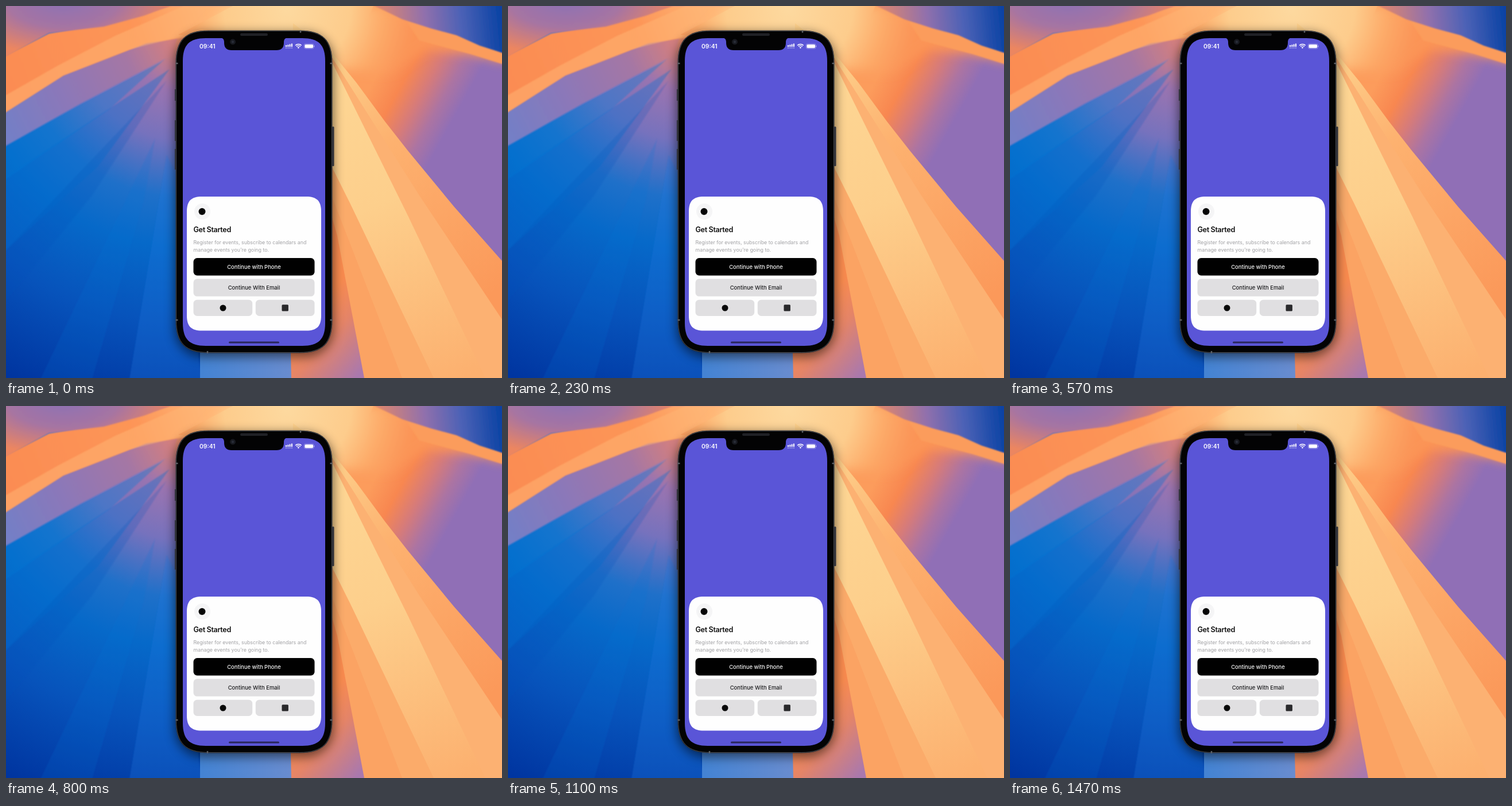
An HTML page that plays this animation: 864x648 px, repeating every 1510 ms.

```html
<!DOCTYPE html>
<html lang="en">
<head>
<meta charset="utf-8">
<title>Get Started</title>
<style>
  html, body { margin: 0; width: 100%; height: 100%; overflow: hidden; background: #0a55ba; }
  svg { display: block; width: 864px; height: 648px; }
  text { font-family: Inter, "Liberation Sans", sans-serif; }
  .mid { text-anchor: middle; font-size: 9.45px; font-weight: 500; }
  .note { font-size: 8.85px; fill: #a2a2a5; }
</style>
</head>
<body>
<svg viewBox="0 0 864 648" xmlns="http://www.w3.org/2000/svg">
  <defs>
    <radialGradient id="sea" gradientUnits="userSpaceOnUse" cx="305" cy="55" r="660">
      <stop offset="0" stop-color="#e68b66"/>
      <stop offset=".07" stop-color="#c27c8c"/>
      <stop offset=".14" stop-color="#9a74b0"/>
      <stop offset=".27" stop-color="#7672bd"/>
      <stop offset=".42" stop-color="#1f70c9"/>
      <stop offset=".55" stop-color="#0669c9"/>
      <stop offset=".75" stop-color="#0753bb"/>
      <stop offset="1" stop-color="#0035a0"/>
    </radialGradient>
    <linearGradient id="haze" gradientUnits="userSpaceOnUse" x1="290" y1="70" x2="0" y2="215">
      <stop offset="0" stop-color="#d27f80"/>
      <stop offset=".25" stop-color="#a577a4"/>
      <stop offset=".65" stop-color="#8b78b9"/>
      <stop offset="1" stop-color="#747fc6"/>
    </linearGradient>
    <radialGradient id="dusk" gradientUnits="userSpaceOnUse" cx="0" cy="0" r="1" gradientTransform="translate(100 -10) scale(195 95)">
      <stop offset="0" stop-color="#8c72b5"/>
      <stop offset=".5" stop-color="#a674a2"/>
      <stop offset="1" stop-color="#ec8660"/>
    </radialGradient>
    <linearGradient id="band" gradientUnits="userSpaceOnUse" x1="0" y1="150" x2="400" y2="0">
      <stop offset="0" stop-color="#fb8c52"/>
      <stop offset=".6" stop-color="#fd9658"/>
      <stop offset="1" stop-color="#ffc384"/>
    </linearGradient>
    <radialGradient id="glow" gradientUnits="userSpaceOnUse" cx="490" cy="5" r="220">
      <stop offset="0" stop-color="#fdd99f"/>
      <stop offset=".5" stop-color="#fdcc8c"/>
      <stop offset=".75" stop-color="#fdab69"/>
      <stop offset="1" stop-color="#fb9457"/>
    </radialGradient>
    <linearGradient id="plum" gradientUnits="userSpaceOnUse" x1="640" y1="130" x2="775" y2="205">
      <stop offset="0" stop-color="#fc9c5c"/>
      <stop offset=".3" stop-color="#f88750"/>
      <stop offset=".55" stop-color="#d67b7a"/>
      <stop offset=".78" stop-color="#ac74a2"/>
      <stop offset="1" stop-color="#906fb6"/>
    </linearGradient>
    <linearGradient id="night" gradientUnits="userSpaceOnUse" x1="655" y1="20" x2="864" y2="0">
      <stop offset="0" stop-color="#d98571"/>
      <stop offset=".35" stop-color="#9170ac"/>
      <stop offset=".65" stop-color="#4d62b6"/>
      <stop offset="1" stop-color="#0741a3"/>
    </linearGradient>
    <linearGradient id="ray" gradientUnits="userSpaceOnUse" x1="570" y1="80" x2="800" y2="648">
      <stop offset="0" stop-color="#fdd795"/>
      <stop offset=".45" stop-color="#fdcf8c"/>
      <stop offset="1" stop-color="#fcb06f"/>
    </linearGradient>
    <linearGradient id="edge" gradientUnits="userSpaceOnUse" x1="570" y1="85" x2="864" y2="490">
      <stop offset="0" stop-color="#fdd08b"/>
      <stop offset=".35" stop-color="#fdb270"/>
      <stop offset="1" stop-color="#fb995a"/>
    </linearGradient>
    <linearGradient id="foot" gradientUnits="userSpaceOnUse" x1="510" y1="560" x2="610" y2="648">
      <stop offset="0" stop-color="#f98b4f"/>
      <stop offset=".4" stop-color="#e48468"/>
      <stop offset="1" stop-color="#a978ae"/>
    </linearGradient>
    <linearGradient id="pool" x1="0" y1="0" x2="1" y2="0">
      <stop offset="0" stop-color="#4383d3"/>
      <stop offset="1" stop-color="#698ccf"/>
    </linearGradient>
    <filter id="soft" x="-20%" y="-30%" width="140%" height="160%"><feGaussianBlur stdDeviation="9"/></filter>
    <filter id="fine" x="-10%" y="-10%" width="120%" height="120%"><feGaussianBlur stdDeviation="1.2"/></filter>
  </defs>

  <!-- wallpaper, left -->
  <rect width="864" height="648" fill="url(#sea)"/>
  <g filter="url(#fine)">
    <path d="M285 85L-5 243V305L180 180Z" fill="#087bd8" opacity=".35"/>
    <path d="M285 110L-5 300V430L160 280Z" fill="#0070d0" opacity=".35"/>
    <path d="M280 130L-5 430V520L150 330Z" fill="#0050b8" opacity=".2"/>
    <path d="M260 230L60 650H150L240 340Z" fill="#1670d0" opacity=".16"/>
    <path d="M280 260L215 650H340L300 300Z" fill="#1c78dc" opacity=".3"/>
    <path d="M300 50L-5 150V246L130 170 290 85Z" fill="url(#haze)"/>
  </g>
  <path d="M-5 88L75 48 180 30 285 0H430L330 52 245 65 100 121 -5 188Z" fill="url(#band)" filter="url(#fine)"/>
  <path d="M-5 158L90 104 190 52 310 0H405L300 54 215 76 100 121 -5 188Z" fill="#ffb675" opacity=".5" filter="url(#fine)"/>
  <path d="M-5 -5H300L240 17 170 36 75 47 -5 91Z" fill="url(#dusk)" filter="url(#fine)"/>

  <!-- wallpaper, right -->
  <path d="M400 0H870V650H495V80Z" fill="url(#plum)"/>
  <path d="M385 0H650L745 38 870 80V98L800 82 730 76 670 115 570 110 330 60Z" fill="url(#glow)" filter="url(#soft)"/>
  <path d="M300 50L395 0H640L600 90Z" fill="url(#glow)"/>
  <path d="M690 15L785 50 870 84V103L810 84 720 60Z" fill="#fb9c5c" filter="url(#fine)"/>
  <path d="M632 -5L690 23 740 39 785 51 825 69 870 83V-5Z" fill="url(#night)" filter="url(#fine)"/>
  <path d="M500 30L570 84 610 133 660 201 700 252 780 349 864 444V648H495Z" fill="url(#edge)"/>
  <path d="M565 85L720 330 864 546V648H500Z" fill="#fcb172"/>
  <path d="M565 92L700 365 835 648H500Z" fill="url(#ray)"/>
  <path d="M560 265L600 345 745 648H500Z" fill="#fbab6a"/>
  <path d="M565 325L690 648H500Z" fill="#fba363"/>
  <path d="M560 340L577 400 624 648H495V560Z" fill="url(#foot)"/>
  <path d="M338 560H495L497 648H338Z" fill="url(#pool)"/>

  <!-- phone -->
  <rect x="293" y="46" width="278" height="566" rx="50" opacity=".5" filter="url(#soft)"/>
  <rect x="568" y="210" width="3.5" height="69" rx="1.5" fill="#30323a"/>
  <path d="M295 145v20M295 199v36M295 249v36" stroke="#30323a" stroke-width="2"/>
  <path data-box="295.5 42.5 273 562 46" fill="#1c1d22"/>
  <path data-box="296.5 43.5 271 560 45" fill="#030304" stroke="#484b50"/>
  <path d="M295.5 100h4M564.5 100h4M295.5 547h4M564.5 547h4M351 601v4M513 42.5v4" stroke="#5c6066" stroke-width="2.5"/>
  <path data-box="308 56 248 536 32" fill="#5a55d7"/>
  <path d="M373 55Q380 56 380 62V64Q380 77 393 77H471Q484 77 484 64V62Q484 56 491 55Z" fill="#030304"/>
  <rect x="408" y="47.5" width="48" height="4.5" rx="2.2" fill="#202126"/>
  <circle cx="395" cy="62.5" r="5" fill="#17191f"/>
  <circle cx="395" cy="62.5" r="2.2" fill="#292d38"/>

  <!-- status bar -->
  <g fill="#fff">
    <text x="337" y="74" font-size="10.3" font-weight="600">09:41</text>
    <path d="M487 68.3h2v2.7h-2zM490.3 67.5h2v3.5h-2zM493.6 66.5h2v4.5h-2zM496.9 65.5h2v5.5h-2z"/>
    <path d="M487 72.3h2v1.4h-2zM490.3 72.3h2v1.4h-2zM493.6 72.3h2v1.4h-2zM496.9 72.3h2v1.4h-2z" opacity=".55"/>
    <rect x="520.5" y="67" width="14.5" height="6.2" rx="1.6"/>
    <rect x="536" y="68.8" width="1.2" height="2.6" rx=".6" opacity=".6"/>
    <path d="M507.6 72.3a2.4 2.4 0 0 1 3.6 0L509.4 74.2Z"/>
  </g>
  <g fill="none" stroke="#fff" stroke-width="1.5">
    <path d="M504.2 68.6a7.4 7.4 0 0 1 10.4 0M506 70.7a4.9 4.9 0 0 1 6.8 0"/>
    <rect x="519.3" y="65.8" width="16.9" height="8.6" rx="2.6" stroke-width=".8" opacity=".4"/>
  </g>

  <!-- sign-in card -->
  <path data-box="315 332 234 233.5 21" fill="#fefefe"/>
  <circle cx="342" cy="358" r="14" fill="#f5f5f6"/>
  <circle cx="341.5" cy="358" r="6" fill="#060606"/>
  <text x="326.5" y="394.3" font-size="12.6" font-weight="600" letter-spacing="-.35" fill="#111">Get Started</text>
  <text class="note" x="326.5" y="415.4">Register for events, subscribe to calendars and</text>
  <text class="note" x="326.5" y="427.8">manage events you're going to.</text>
  <rect x="326.5" y="439" width="211" height="30.5" rx="6.5" fill="#010101"/>
  <text class="mid" x="432" y="458" fill="#f6f6f6">Continue with Phone</text>
  <g fill="#e0dfe1">
    <rect x="326.5" y="475.3" width="211" height="30.5" rx="6.5"/>
    <rect x="326.5" y="511.7" width="102.7" height="28.3" rx="6.5"/>
    <rect x="434.8" y="511.7" width="102.7" height="28.3" rx="6.5"/>
  </g>
  <text class="mid" x="432" y="494" fill="#1b1b1d">Continue With Email</text>
  <circle cx="378" cy="526" r="5.5" fill="#080808"/>
  <rect x="480.5" y="520.2" width="11.4" height="11.4" rx="1.5" fill="#29292b"/>
  <rect x="388" y="584.4" width="88" height="3.2" rx="1.6" fill="#29275a"/>
</svg>
<script>
  // Box with continuous corners: longer and flatter at the ends than a plain arc.
  function smoothBox(x, y, w, h, r) {
    const reach = r * 1.25, pull = r * 0.36, a = reach - pull, b = w - 2 * reach, c = h - 2 * reach;
    return `M${x + reach} ${y}h${b}c${a} 0 ${reach} ${pull} ${reach} ${reach}` +
      `v${c}c0 ${a} ${-pull} ${reach} ${-reach} ${reach}` +
      `h${-b}c${-a} 0 ${-reach} ${-pull} ${-reach} ${-reach}` +
      `v${-c}c0 ${-a} ${pull} ${-reach} ${reach} ${-reach}z`;
  }
  for (const el of document.querySelectorAll('[data-box]'))
    el.setAttribute('d', smoothBox(...el.dataset.box.split(' ').map(Number)));
</script>
</body>
</html>
```
